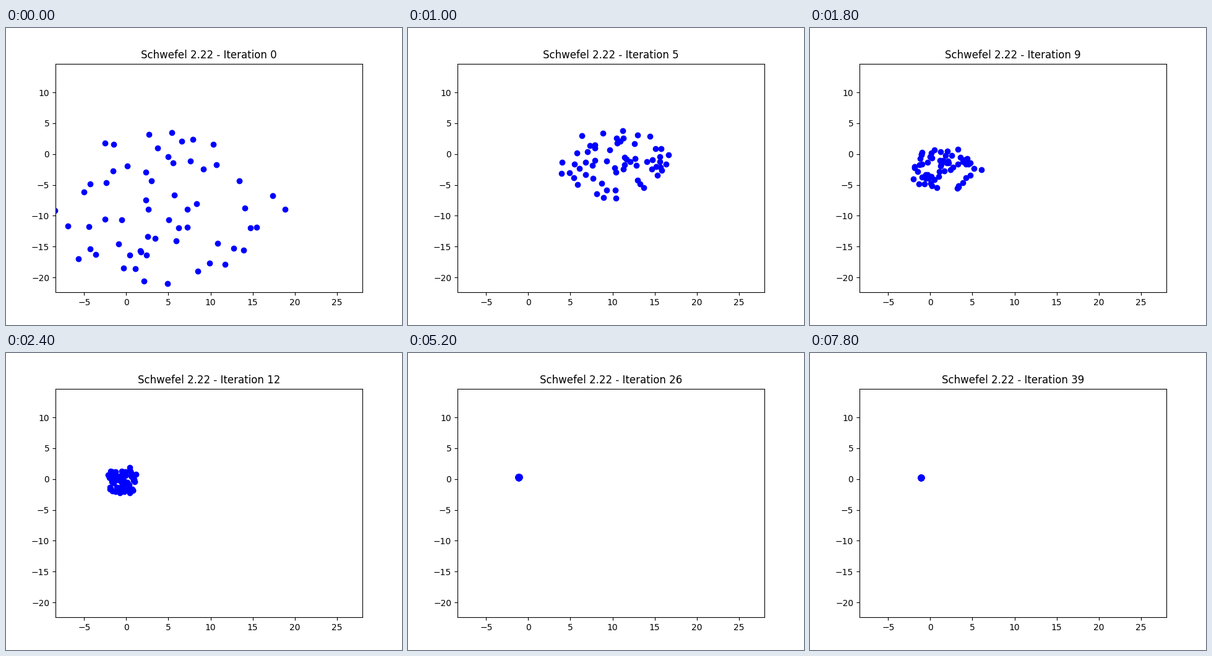
These frames come from a looping animation (640x480 px, 8000 ms). A matplotlib script:

```python
import numpy as np
import matplotlib.pyplot as plt
from matplotlib.animation import FuncAnimation

STEPS, COUNT = 40, 60
XLIM, YLIM = (-8.3975, 28.0225), (-22.415, 14.665)
LEFT, TOP, WIDTH, HEIGHT = 80, 57.6, 496, 369.6  # axes box on the stage

# swarm over time: step, centre x, centre y, radius x, radius y (stage pixels)
KEYS = np.array([
    (0, 262, 295, 190, 130),
    (5, 335, 220, 94, 57),
    (7, 275, 232, 115, 80),
    (9, 218, 227, 60, 35),
    (12, 187, 205, 26, 24),
    (18, 183, 198.5, 5, 4.5),
    (26, 178.8, 200.7, 1.3, 1.2),
    (39, 179.2, 201.4, 0.6, 0.6),
])

# every particle circles the centre at its own distance and speed
rng = np.random.default_rng(22)
dist = rng.uniform(0, 1, COUNT) ** 0.6
phase = rng.uniform(0, 2 * np.pi, COUNT)
spin = rng.normal(0, 0.35, COUNT)


def positions(step):
    cx, cy, rx, ry = (np.interp(step, KEYS[:, 0], col) for col in KEYS.T[1:])
    angle = phase + spin * step
    px = cx + rx * dist * np.cos(angle)
    py = cy + ry * dist * np.sin(angle)
    x = XLIM[0] + (px - LEFT) / WIDTH * (XLIM[1] - XLIM[0])
    y = YLIM[1] - (py - TOP) / HEIGHT * (YLIM[1] - YLIM[0])
    return np.column_stack([x, y])


fig, ax = plt.subplots(figsize=(6.4, 4.8), dpi=100)
dots = ax.scatter(*positions(0).T, color="blue")
ax.set_xlim(*XLIM)
ax.set_ylim(*YLIM)
title = ax.set_title("")


def draw(step):
    dots.set_offsets(positions(step))
    title.set_text(f"Schwefel 2.22 - Iteration {step}")
    return dots, title


anim = FuncAnimation(fig, draw, frames=STEPS, interval=200, repeat=True,
                     repeat_delay=0, blit=False)
plt.show()
```
